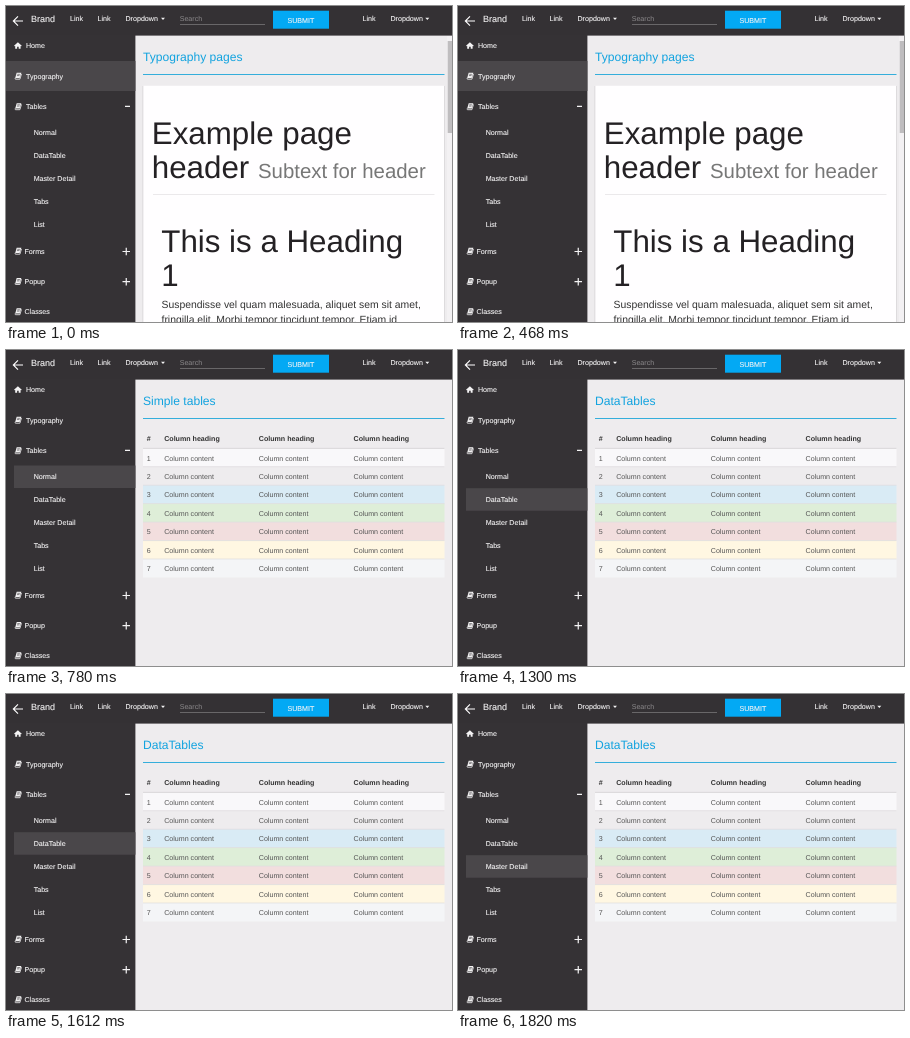
Write an HTML page that moves like this. It is 446 px wide and 316 px high and loops after 2.08 s.

```html
<!DOCTYPE html>
<html lang="en">
<head>
<meta charset="utf-8">
<title>Admin theme tour</title>
<style>
  html, body { margin: 0; width: 100%; height: 100%; overflow: hidden; background: #eeecee; }
  svg { display: block; width: 446px; height: 316px; }
  text { font-family: "Liberation Sans", Arial, sans-serif; font-size: 7.1px; text-rendering: geometricPrecision; }
  .nav text { fill: #f4f3f4; stroke: #f4f3f4; stroke-width: .12px; }
  .nav .brand { font-size: 9px; }
  .nav .hint { fill: #8b898b; stroke: none; }
  .title { font-size: 12.1px; fill: #12a3df; }
  .big { font-size: 31.3px; fill: #242124; }
  .body { font-size: 10.4px; fill: #333; }
  .cell { fill: #555; }
  .head { fill: #333; font-weight: bold; }

  .typography, .tables, .normal, .datatable, .data, .detail {
    visibility: hidden;
    animation: 2080ms step-end infinite;
  }
  .typography { animation-name: typography; }
  .tables { animation-name: tables; }
  .normal { animation-name: normal; }
  .datatable { animation-name: datatable; }
  .data { animation-name: data; }
  .detail { animation-name: detail; }
  @keyframes typography { 0% { visibility: visible } 37.5%, 100% { visibility: hidden } }
  @keyframes tables { 0% { visibility: hidden } 37.5%, 100% { visibility: visible } }
  @keyframes normal { 0% { visibility: hidden } 37.5% { visibility: visible } 62.5%, 100% { visibility: hidden } }
  @keyframes datatable { 0% { visibility: hidden } 62.5% { visibility: visible } 87.5%, 100% { visibility: hidden } }
  @keyframes data { 0% { visibility: hidden } 62.5%, 100% { visibility: visible } }
  @keyframes detail { 0% { visibility: hidden } 87.5%, 100% { visibility: visible } }
</style>
</head>
<body>
<svg viewBox="0 0 446 316" xmlns="http://www.w3.org/2000/svg">
  <defs>
    <g id="book">
      <path d="M2.2 0H6.8L5.2 5.4H.7Z" fill="#f4f3f4"/>
      <path d="M.7 5.2Q.2 6.5 1.2 6.5H5.4L7 1.2" fill="none" stroke="#f4f3f4" stroke-width=".8"/>
      <path d="M2.8 1.6H5.4M2.4 2.9H5" stroke="#353235" stroke-width=".6"/>
    </g>
  </defs>
  <rect width="446" height="316" fill="#eeecee"/>

  <g class="typography">
    <rect x="136.5" y="80" width="302.5" height="240" fill="#d5d3d5"/>
    <rect x="137.3" y="79.8" width="300.9" height="240" fill="#fffeff"/>
    <text class="title" x="137" y="55">Typography pages</text>
    <text class="big" x="145.8" y="138">Example page</text>
    <text class="big" x="145.8" y="172.3">header <tspan font-size="20.4" fill="#777">Subtext for header</tspan></text>
    <path d="M147 188.5H428.5" stroke="#ebe9eb"/>
    <text class="big" x="155.3" y="245.5">This is a Heading</text>
    <text class="big" x="155.3" y="280">1</text>
    <text class="body" x="155.5" y="302">Suspendisse vel quam malesuada, aliquet sem sit amet,</text>
    <text class="body" x="155.5" y="317">fringilla elit. Morbi tempor tincidunt tempor. Etiam id</text>
    <rect x="441" y="30" width="5" height="286" fill="#f3f1f3"/>
    <rect x="441.7" y="35" width="4.3" height="92" fill="#bfbdbf"/>
  </g>

  <g class="tables">
    <text class="title normal" x="137" y="55">Simple tables</text>
    <text class="title data" x="137" y="55">DataTables</text>
    <g id="table"></g>
  </g>
  <path d="M137 68.5H438.5" stroke="#35aedb"/>

  <g class="nav">
    <rect width="446" height="29.6" fill="#343134"/>
    <rect y="29" width="129.4" height="287" fill="#353235"/>
    <g fill="#4a474a">
      <rect class="typography" y="55" width="129.4" height="30"/>
      <rect class="normal" x="8" y="115.5" width="121.4" height="22.5"/>
      <rect class="datatable" x="8" y="138.2" width="121.4" height="22.5"/>
      <rect class="detail" x="8" y="161.2" width="121.4" height="22.5"/>
    </g>
    <g id="menu"></g>

    <path d="M17 15H7.8M12 10.3L7.3 15L12 19.7" fill="none" stroke="#fff" stroke-width="1.1"/>
    <text class="brand" x="25" y="15.5">Brand</text>
    <text x="64" y="15">Link</text>
    <text x="91.5" y="15">Link</text>
    <text x="119.5" y="15">Dropdown</text>
    <text class="hint" x="173.7" y="15.3">Search</text>
    <path d="M174 18.5H259" stroke="#777577" stroke-width=".8"/>
    <rect x="267" y="4.7" width="56" height="18" fill="#03a9f4"/>
    <text x="281.5" y="16.5">SUBMIT</text>
    <text x="356.5" y="15">Link</text>
    <text x="384.5" y="15">Dropdown</text>
    <path d="M155 11.8h4l-2 2.2zM419.3 11.8h4l-2 2.2z" fill="#f4f3f4"/>
    <path d="M8 39.8L11.9 36.2L15.8 39.8L15.2 40.3L14.6 39.9V42.7H12.7V40.7H11.1V42.7H9.2V39.9L8.6 40.3Z" fill="#f4f3f4"/>
    <path d="M119 100.3H124M116.5 245.5H124M120.25 241.7V249.3M116.5 275.7H124M120.25 271.9V279.5" stroke="#f4f3f4" stroke-width="1.2"/>
  </g>
</svg>
<script>
  const label = (x, y, str, cls = "") => `<text class="${cls}" x="${x}" y="${y}">${str}</text>`;

  const groups = [["Home", 42], ["Typography", 72.5], ["Tables", 103], ["Forms", 247.5], ["Popup", 277.8], ["Classes", 308]];
  const pages = ["Normal", "DataTable", "Master Detail", "Tabs", "List"];
  // Collapsible groups sit closer to their icon
  const indent = name => /Forms|Popup|Classes/.test(name) ? 18.5 : 20;
  document.getElementById("menu").innerHTML =
    groups.map(([name, y], i) =>
      label(indent(name), y, name) + (i ? `<use href="#book" x="8.5" y="${y - 5.8}"/>` : "")).join("") +
    pages.map((name, i) => label(27.7, 129 + i * 22.9, name)).join("");

  const columns = [158.2, 252.8, 347.6];
  const fills = ["#f9f8fa", "#eeecee", "#d9ebf5", "#deeed8", "#f2dede", "#fff7e2", "#f4f5f7"];
  const tableTop = 98.3, rowHeight = 18.45;
  const row = (y, first, str, cls) =>
    label(140.8, y, first, cls) + columns.map(x => label(x, y, str, cls)).join("");

  document.getElementById("table").innerHTML = row(91.3, "#", "Column heading", "head") +
    fills.map((fill, i) => {
      const y = tableTop + i * rowHeight;
      return `<rect x="137" y="${y}" width="301.5" height="${rowHeight}" fill="${fill}"/>` +
        `<path d="M137 ${y}H438.5" stroke="#dddbdd" stroke-width="${i ? 0.7 : 1.2}"/>` +
        row(y + 12.2, i + 1, "Column content", "cell");
    }).join("");
</script>
</body>
</html>
```
